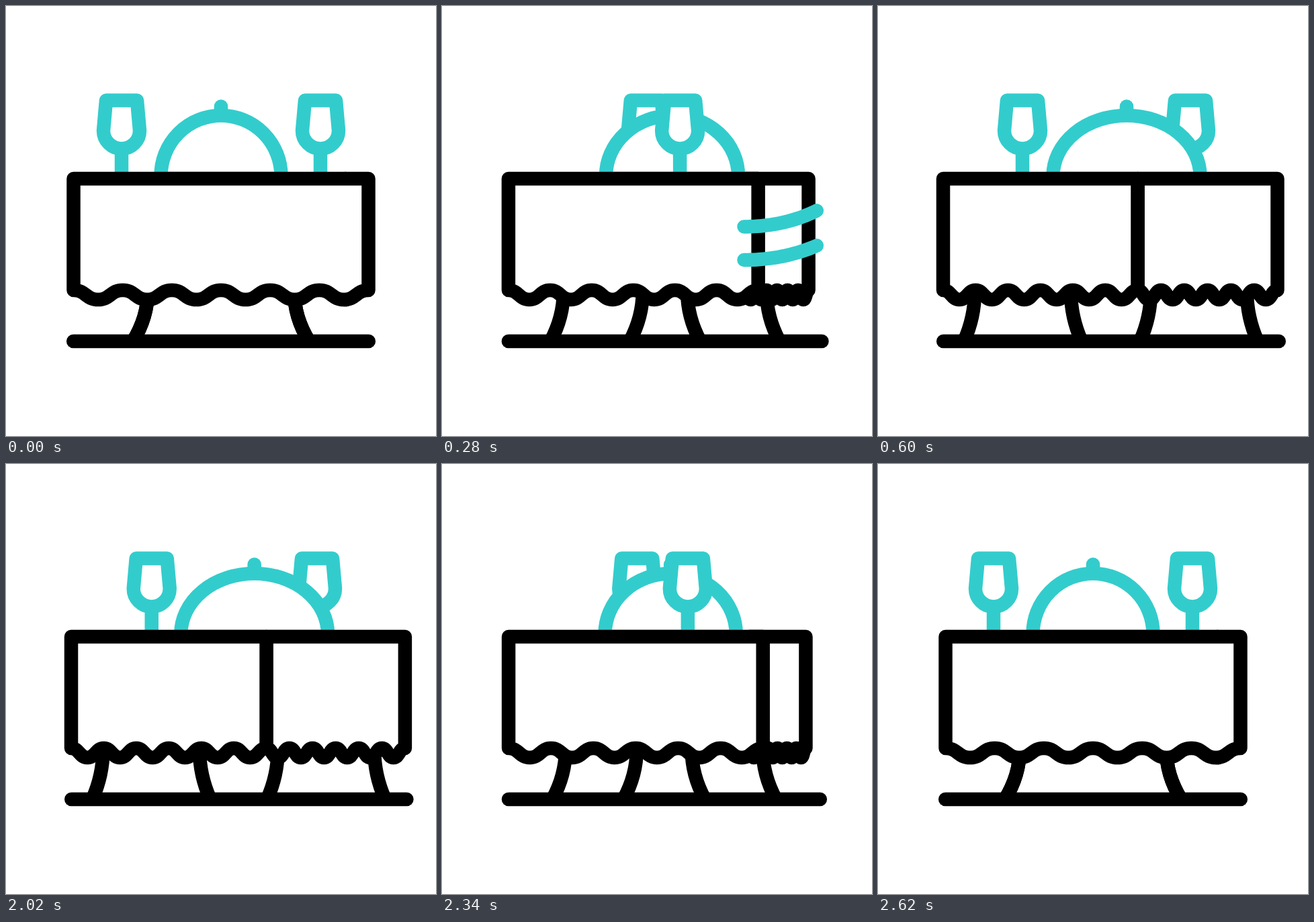
Animation of 640x640 px, one loop 2800 ms. Source, as an HTML page with a canvas:

```html
<!DOCTYPE html>
<html>
<head>
<meta charset="utf-8">
<style>
html, body { margin: 0; width: 100%; height: 100%; overflow: hidden; background: #fff; }
canvas { display: block; width: 640px; height: 640px; }
</style>
</head>
<body>
<canvas id="stage" width="640" height="640"></canvas>
<script>
const ctx = document.getElementById('stage').getContext('2d');
const LOOP = 2800, TEAL = '#33cccc', BLACK = '#000';

// Smooth 0..1 ramp between two times
function ramp(t, from, to) {
  const u = Math.min(1, Math.max(0, (t - from) / (to - from)));
  return u * u * (3 - 2 * u);
}

function draw(path, color, filled) {
  if (filled) {
    ctx.fillStyle = '#fff';
    ctx.fill(path);
  }
  ctx.strokeStyle = color;
  ctx.stroke(path);
}

function glass(x) {
  draw(new Path2D(`M${x} 212V257`), TEAL);
  draw(new Path2D(`M${x - 23} 140.5h46l4 45a27 27 0 0 1 -54 0z`), TEAL, true);
}

function cloche(p) {
  const x = 320 + 50 * p, rx = 89.5 + 20 * p;
  draw(new Path2D(`M${x} 149.5V163`), TEAL);
  draw(new Path2D(`M${x - rx} 257v-4a${rx} 90 0 0 1 ${2 * rx} 0v4z`), TEAL, true);
}

// dir is -1 for a leg bending left, 1 for right
function leg(x, dir, p) {
  const foot = x + dir * (22 - 6 * p);
  ctx.lineCap = 'butt';
  draw(new Path2D(`M${x} 425Q${x} 463 ${foot} 499`), BLACK);
  ctx.lineCap = 'round';
}

// One face of the cloth: straight top and sides, six waves along the hem
function cloth(left, right) {
  const h = (right - left) / 12, c = h / 2;
  const wave = `c${-c} 0 ${-c} 14 ${-h} 14s${-c} -14 ${-h} -14`;
  draw(new Path2D(`M${left} 423V257H${right}V423${wave.repeat(6)}z`), BLACK, true);
}

// Part of a curved speed line, from its tail to its head
function speedLine(top, bottom, tail, head) {
  const path = new Path2D();
  for (let i = 0; i <= 24; i++) {
    const t = tail + (head - tail) * i / 24, s = 1 - t;
    path.lineTo(s * s * 603 + 2 * s * t * 537 + t * t * 449.5,
                bottom - (bottom - top) * s * s);
  }
  draw(path, TEAL);
}

function render(t) {
  const p = ramp(t, 0, 600) - ramp(t, 1990, 2610);
  ctx.clearRect(0, 0, 640, 640);
  ctx.lineWidth = 20.5;
  ctx.lineCap = ctx.lineJoin = 'round';

  glass(172 + 293 * p);
  cloche(p);
  glass(468 - 253 * p);

  leg(211 + 195 * p, -1, p);
  leg(429 + 120 * p, 1, p);
  leg(211 - 67 * p, -1, p);
  leg(429 - 142 * p, 1, p);

  cloth(505 - 118.5 * p, 505.5 + 89 * p);
  cloth(100.5 - 3.5 * p, 539.5 - 153 * p);
  draw(new Path2D(`M${100.2 - 3 * p} 499H${539.8 + 57 * p}`), BLACK);

  const head = ramp(t, 20, 280), tail = ramp(t, 120, 540);
  if (head > tail) {
    speedLine(276, 328.5, tail, head);
    speedLine(331, 378, tail, head);
  }
}

function tick() {
  // The motion advances in 20 ms steps
  render(Math.floor(performance.now() % LOOP / 20) * 20);
  requestAnimationFrame(tick);
}
tick();
</script>
</body>
</html>
```
